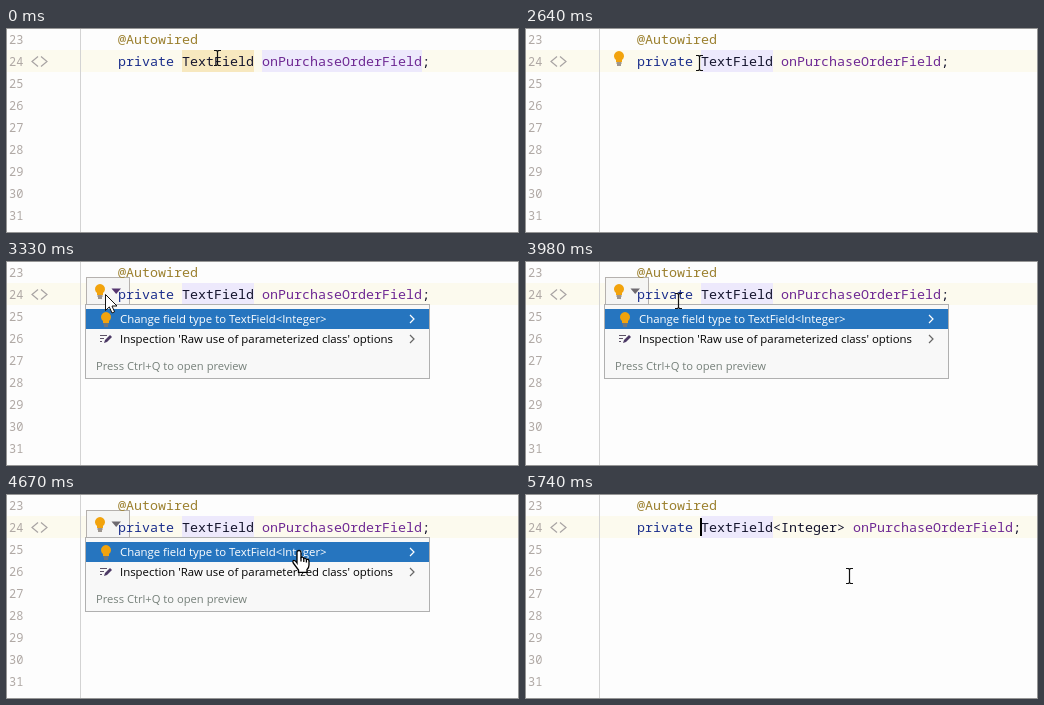
These frames come from a looping animation (513 px wide and 205 px high, 5860 ms). An HTML page:

```html
<!DOCTYPE html>
<html lang="en">
<head>
<meta charset="utf-8">
<title>Quick fix in a code editor</title>
<style>
  html, body { margin: 0; width: 100%; height: 100%; overflow: hidden; background: #fdfdfd; }
  svg { display: block; }
  text { white-space: pre; }
  .code { font: 13.333px "Noto Sans Mono", monospace; }
  .nums { font: 12px "Noto Sans Mono", monospace; fill: #b0a9a5; }
  .menu { font: 11.4px "Open Sans", sans-serif; }
  .line { fill: none; stroke-width: 1.2; }
</style>
</head>
<body>
<svg width="513" height="205" viewBox="0 0 513 205">
  <defs>
    <g id="bulb">
      <path d="M-3 4V2A5 5 0 1 1 3 2V4Z" fill="#f2a30c"/>
      <path d="M-2.5 5H2.5M-2 7H2" stroke="#80756c" stroke-width="1.3"/>
    </g>
  </defs>

  <rect y="22" width="513" height="22" fill="#fcfaee"/>
  <path d="M74.5 0V205" stroke="#d3d3d3"/>
  <g id="nums" class="nums"></g>
  <path class="line" d="M32 28.5L26 33.5L32 38.5M35 28.5L41 33.5L35 38.5" stroke="#a8a3a3"/>

  <rect id="typeMark" x="176" y="22" width="72" height="22"/>
  <rect id="nameMark" x="256" y="22" width="160" height="22" fill="#ede9fc"/>
  <rect id="argMark" x="248" y="22" width="72" height="22" fill="#f7e8bf"/>

  <g id="button">
    <rect x="80.5" y="16.5" width="43" height="28" fill="#f5f5f4" stroke="#b5b1ae"/>
    <path id="arrowDown" d="M105.5 27.5H115L110.2 33Z"/>
  </g>
  <use id="hint" href="#bulb" x="94" y="30"/>

  <g class="code">
    <text x="112" y="16" fill="#9c8130">@Autowired</text>
    <text x="112" y="38" fill="#1c2f8c">private</text>
    <text id="type" x="176" y="38" fill="#15152e"></text>
    <text id="name" y="38" fill="#6f2a94">onPurchaseOrderField<tspan fill="#15152e">;</tspan></text>
  </g>
  <rect id="caret" y="24" width="2" height="18" fill="#000"/>

  <g id="popup" class="menu">
    <rect x="79.5" y="43.5" width="344" height="74" fill="#f8f8f8" stroke="#b0b0b0"/>
    <rect x="80" y="48" width="343" height="20" fill="#2675bf"/>
    <use href="#bulb" x="100" y="58"/>
    <path class="line" d="M94 74.5H101M94 77.5H98M94 80.5H96" stroke="#5d5266"/>
    <path d="M98 82L99 79L104 74L106 76L101 81Z" fill="#4d3a66"/>
    <text x="114" y="62" fill="#fff">Change field type to TextField&lt;Integer&gt;</text>
    <text x="114" y="82" fill="#000">Inspection 'Raw use of parameterized class' options</text>
    <text x="90" y="109" fill="#76807a" font-size="11.2">Press Ctrl+Q to open preview</text>
    <path class="line" d="M404 54L408 58L404 62" stroke="#fff"/>
    <path class="line" d="M404 74L408 78L404 82" stroke="#666"/>
  </g>

  <g id="beam">
    <path class="line" d="M-3.5-7.5H-1L0-6.5L1-7.5H3.5M0-6.5V6.5M-3.5 7.5H-1L0 6.5L1 7.5H3.5" stroke="#111"/>
  </g>
  <path id="arrow" d="M.5.5V16.5L4.3 12.9L7 19L9.6 17.9L7 12H12Z" fill="#fff" stroke="#111"/>
  <g id="hand" fill="#fff" stroke="#000" stroke-width="1.3">
    <path d="M5 13V2.5Q5 .5 7 .5T9 2.5V7.5Q11 6.5 11.8 8.5Q13.5 7.5 14.4 9.5Q17 8.5 17 11.5V15Q17 18 15 19.5V22.3H6.5V20L2 14Q0 11.5 1.5 10.5Q3 10 5 13Z"/>
    <path d="M9 7.5V11.5M11.8 8.5V12M14.4 9.5V12.5"/>
  </g>
  <rect x=".5" y=".5" width="512" height="204" fill="none" stroke="#969696"/>
</svg>

<script>
const LOOP = 5860;
const $ = id => document.getElementById(id);
const show = (id, on) => $(id).setAttribute("visibility", on ? "visible" : "hidden");

// time, pointer shape, x, y
const pointer = [
  [0, "beam", 211.5, 30], [2640, "beam", 174.5, 35],
  [2790, "beam", 150, 38], [2910, "beam", 122, 38],
  [3030, "arrow", 99, 35], [3180, "arrow", 99, 33],
  [3860, "beam", 126, 37], [3980, "beam", 153.5, 40],
  [4130, "hand", 171, 45], [4280, "hand", 207, 51],
  [4400, "hand", 233, 54], [4520, "hand", 253, 56],
  [4670, "hand", 286, 56], [4790, "beam", 293.5, 56],
  [5620, "beam", 309, 69], [5740, "beam", 324.5, 82]
];

for (let n = 23; n <= 31; n++) {
  $("nums").innerHTML += `<text x="3" y="${16 + (n - 23) * 22}">${n}</text>`;
}

function draw(t) {
  const within = (from, to) => t >= from && t < to;
  const fixed = t >= 4790;

  $("type").textContent = fixed ? "TextField<Integer>" : "TextField";
  $("name").setAttribute("x", fixed ? 328 : 256);
  $("typeMark").setAttribute("fill", t < 1340 ? "#f7e8bf" : "#ede9fc");
  show("nameMark", t < 1340);
  show("argMark", within(4790, 5620));

  $("caret").setAttribute("x", fixed ? 175 : 207);
  show("caret", within(1340, 2270) || within(2790, 3330) || fixed);

  show("hint", within(2390, 4790));
  show("button", within(3030, 4790));
  $("arrowDown").setAttribute("fill", t < 3860 ? "#55356f" : "#6e6a70");
  show("popup", within(3330, 4790));

  const [, shape, x, y] = pointer.findLast(step => step[0] <= t);
  for (const id of ["beam", "arrow", "hand"]) show(id, id === shape);
  $(shape).setAttribute("transform", `translate(${x} ${y})`);
}

function tick() {
  draw(performance.now() % LOOP);
  requestAnimationFrame(tick);
}
tick();
</script>
</body>
</html>
```
